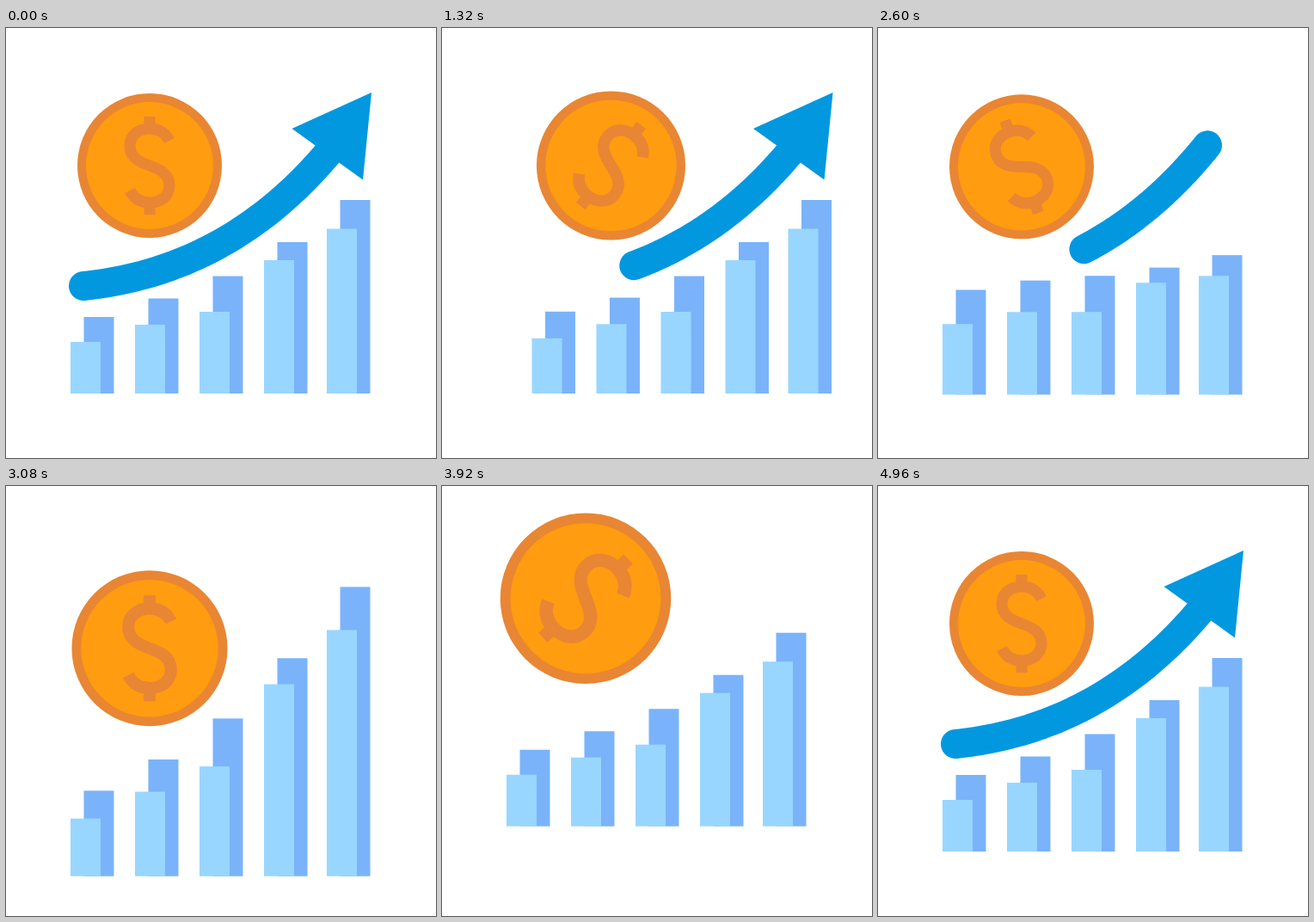
These frames come from a looping animation (500 px wide and 500 px high, 5 s). An HTML page with a canvas:

```html
<!DOCTYPE html>
<html lang="en">
<head>
<meta charset="utf-8">
<title>Growth chart</title>
<style>
  html, body { margin: 0; width: 100%; height: 100%; overflow: hidden; background: #fff; }
  canvas { display: block; width: 100vmin; height: 100vmin; }
</style>
</head>
<body>
<canvas id="stage" width="500" height="500"></canvas>
<script>
const ctx = document.getElementById('stage').getContext('2d');
const LOOP = 5000, STEP = 40;
const BLUE = '#0298e0', FRONT = '#99d6ff', BACK = '#7ab3fa', GOLD = '#ff9c0f', RIM = '#e88634';

const clamp = v => Math.min(1, Math.max(0, v));
const ease = (t, start, length) => {
  const p = clamp((t - start) / length);
  return p * p * (3 - 2 * p);
};

// Runs fn with the canvas moved to (x, y) and scaled.
function placed(x, y, scale, fn) {
  ctx.save();
  ctx.translate(x, y);
  ctx.scale(scale, scale);
  fn();
  ctx.restore();
}

// Out to +1, across to -1, back to 0.
const sway = (t, out, across, back) =>
  ease(t, out, 620) - 2 * ease(t, across, 480) + ease(t, back, 620);

const SWAY = 29.5;
const shiftX = t => -SWAY * sway(t, 0, 800, 1580);
const shiftY = t => SWAY * sway(t, 2520, 3280, 3890);

// Bars bounce high, low, high and settle, one after another.
const BEAT = 510, LAG = 80, HIGH = 0.5, LOW = -0.31;
function barScale(t) {
  const beat = n => ease(t, 1200 + n * BEAT, BEAT);
  return 1 + HIGH * (beat(0) - beat(3)) + (LOW - HIGH) * (beat(1) - beat(2));
}

const frontHeights = [60, 80, 95, 155, 191.5];
const backHeights = [89, 110.5, 136.5, 176, 225];

function drawBars(t) {
  const bar = (x, height, color) => {
    ctx.fillStyle = color;
    ctx.fillRect(x, 425 - height, 35, height);
  };
  frontHeights.forEach((front, i) => {
    const x = Math.min(75 + 75 * i, 373), s = barScale(t - i * LAG);
    bar(x + 15.5, backHeights[i] * s, BACK);
    bar(x, front * s, FRONT);
  });
}

function disc(r, color) {
  ctx.fillStyle = color;
  ctx.beginPath();
  ctx.arc(0, 0, r, 0, 2 * Math.PI);
  ctx.fill();
}

// Upper half of the sign; the lower half is the same turned by 180 degrees.
const halfDollar = new Path2D(
  'M0 0C-11 -4 -23 -9 -23 -23C-23 -36 -12 -43 0 -43C10 -43 18 -39 23 -29M0 -43V-57');

function drawCoin(t) {
  const spin = start => clamp((t - start) / 1520);
  const scale = 1 + 0.155 * (ease(t, 545, 523) - ease(t, 1068, 352))
                  + 0.3 * (ease(t, 2870, 630) - ease(t, 3620, 700));
  placed(167, 160, scale, () => {
    disc(84, RIM);
    disc(74, GOLD);
    ctx.rotate((spin(1164) + 2 * spin(3440)) * 2 * Math.PI);
    ctx.strokeStyle = RIM;
    ctx.lineWidth = 13;
    for (let half = 0; half < 2; half++) {
      ctx.stroke(halfDollar);
      ctx.rotate(Math.PI);
    }
  });
}

// Quadratic curve through the shaft of the arrow.
function shaftPoint(u) {
  const v = 1 - u;
  const mix = (a, b, c) => a * v * v + 2 * b * u * v + c * u * u;
  return [mix(90, 265, 383), mix(300, 282, 135)];
}

function drawShaft(from, to) {
  ctx.beginPath();
  for (let i = 0; i <= 60; i++) ctx.lineTo(...shaftPoint(from + (to - from) * i / 60));
  ctx.strokeStyle = BLUE;
  ctx.lineWidth = 34;
  ctx.lineCap = ctx.lineJoin = 'round';
  ctx.stroke();
}

function drawHead() {
  ctx.fillStyle = BLUE;
  ctx.beginPath();
  ctx.moveTo(49, -70);
  ctx.lineTo(-43.5, -28);
  ctx.lineTo(39, 31.5);
  ctx.fill();
}

// Each pass draws the arrow from its tail, then wipes it out from the tail.
const SWEEP = 430, POP = 150;
const passes = [
  { grow: -LOOP, wipe: 1160 },
  { grow: 2130, wipe: 2396 },
  { grow: 4064, wipe: 2 * LOOP }
];

function drawArrow(t) {
  for (const { grow, wipe } of passes) {
    const tail = ease(t, wipe, SWEEP), tip = ease(t, grow, SWEEP);
    const head = ease(t, grow + SWEEP + STEP, POP) - ease(t, wipe + SWEEP, POP);
    if (tip > tail) placed(0, 0, 1, () => drawShaft(tail, tip));
    if (head > 0) placed(376, 145, head, drawHead);
  }
}

function draw(t) {
  ctx.fillStyle = '#fff';
  ctx.fillRect(0, 0, 500, 500);
  placed(shiftX(t), shiftY(t), 1, () => {
    drawBars(t);
    drawCoin(t);
    drawArrow(t);
  });
}

const begin = performance.now();
function tick() {
  const t = (performance.now() - begin) % LOOP;
  draw(Math.floor(t / STEP) * STEP);
  requestAnimationFrame(tick);
}
tick();
</script>
</body>
</html>
```
